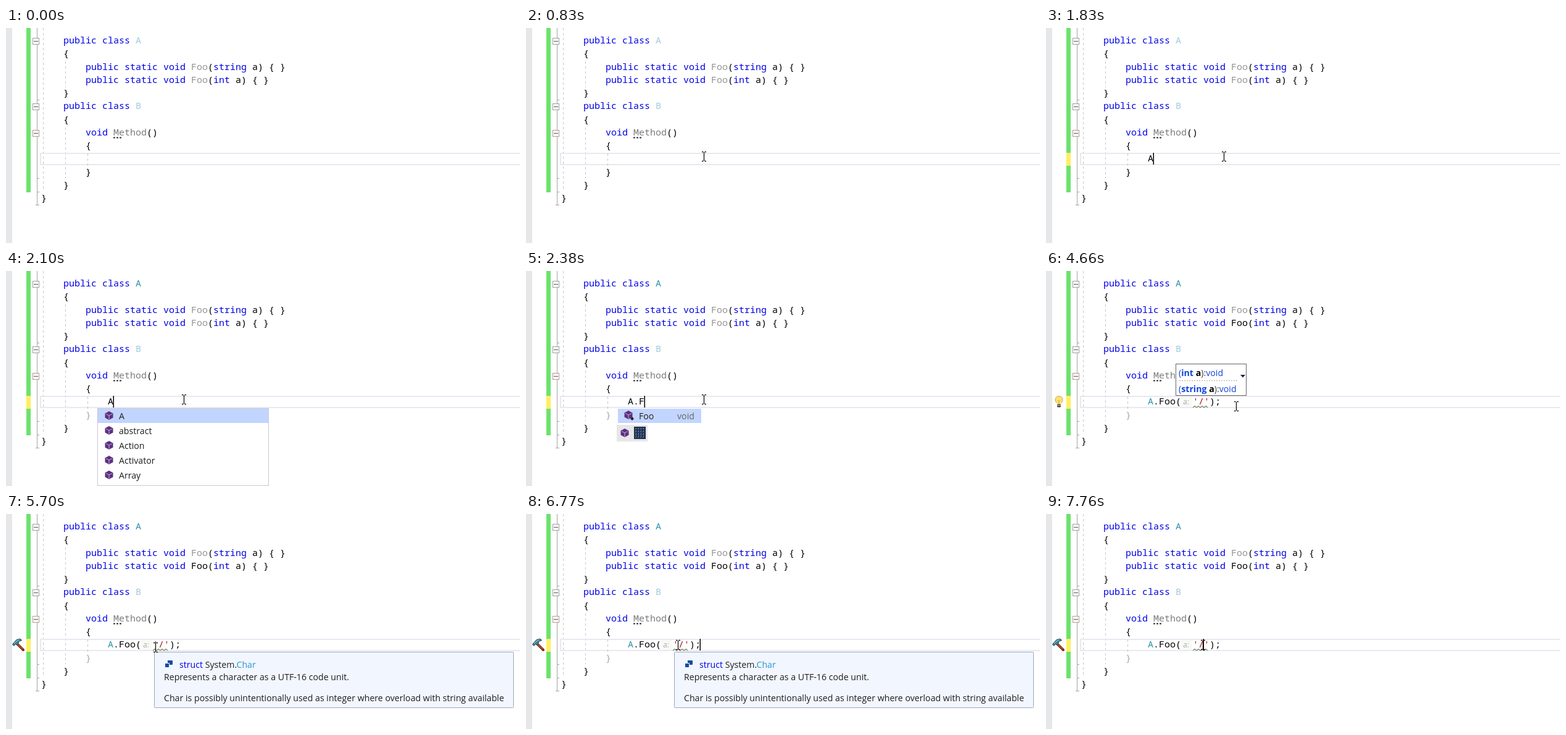
Animation of 833 by 348 pixels, one loop 8000 ms. Source, as an HTML page:

```html
<!DOCTYPE html>
<html lang="en">
<head>
<meta charset="utf-8">
<title>Code editor</title>
<style>
html, body { margin: 0; width: 100%; height: 100%; overflow: hidden; background: #fff; }
svg { display: block; }
text { white-space: pre; }
.code { font: 15px "Noto Sans Mono", "DejaVu Sans Mono", monospace; }
.ui { font: 14.17px "Open Sans", "Noto Sans", sans-serif; }
.hint { font: 12px "Open Sans", "Noto Sans", sans-serif; }
.b { font-weight: 700; }
</style>
</head>
<body>
<svg id="stage" width="833" height="348" viewBox="0 0 833 348"></svg>
<script>
const LOOP = 8000, STEP = 70;
const BLACK = '#000', KEY = '#0000e6', TYPE = '#2b91af', FADED = '#9fcbdb', GREY = '#949494';
const QUOTE = '#a31515', BLUE = '#0f43e0', PURPLE = '#5c3080';

const stage = document.getElementById('stage');
const colX = col => 57 + 9 * col;
const rowY = row => Math.round(25 + 21.25 * row);
const escapeText = s => s.replace(/&/g, '&amp;').replace(/</g, '&lt;');

const rect = (x, y, w, h, fill, extra = '') =>
  `<rect x="${x}" y="${y}" width="${w}" height="${h}" fill="${fill}" ${extra}/>`;
const path = (d, stroke, extra = '') => `<path d="${d}" fill="none" stroke="${stroke}" ${extra}/>`;
const shape = (d, fill, extra = '') => `<path d="${d}" fill="${fill}" ${extra}/>`;
const label = (x, y, s, fill, cls = 'ui') =>
  `<text class="${cls}" x="${x}" y="${y}" fill="${fill}">${escapeText(s)}</text>`;
const code = (col, row, s, fill = BLACK) => label(colX(col), rowY(row), s, fill, 'code');

// Parts are [text, colour, class] runs that follow each other.
const runs = (x, y, parts) => `<text class="ui" x="${x}" y="${y}">` +
  parts.map(([s, fill, cls = '']) => `<tspan class="${cls}" fill="${fill}">${s}</tspan>`).join('') + '</text>';

// Last entry whose start time has passed.
const at = (list, t) => list.reduce((found, item) => item[0] <= t ? item : found, list[0]);

const typed = [
  [0, ''], [1830, 'A'], [2170, 'A.'], [2310, 'A.F'],
  [2780, 'A.Foo();'], [3720, "A.Foo('');"], [3920, "A.Foo('/');"]
];
const carets = [
  [0, 0], [1100, 165], [1500, 0], [1830, 174], [2170, 183], [2310, 192], [2780, 219],
  [3320, 0], [3720, 228], [3920, 237], [4190, 256], [4400, 282], [4660, 0], [4930, 282],
  [5390, 0], [5850, 282], [6310, 0], [6770, 282], [7230, 0], [7690, 282], [7760, 255]
];
// Pointer moves: start, end, from x, y, to x, y.
const moves = [
  [200, 830, 476, 291, 288, 208],
  [1030, 1030, 297, 200, 297, 200],
  [1100, 1100, 288, 208, 288, 208],
  [4660, 5420, 308, 219, 242, 216],
  [5700, 5980, 242, 216, 246, 212],
  [7690, 7690, 240, 204, 240, 204],
  [7760, 7760, 254, 212, 254, 212]
];

function foldBox(y, color) {
  return rect(43.5, y - 4.5, 10, 10, '#fff', `stroke="${color}"`) + path(`M45 ${y + .5}H52`, '#555');
}

function margin(t) {
  const guide = (x, y1, y2) => path(`M${x} ${y1}V${y2}`, '#c8c8c8', 'stroke-dasharray="4 4"');
  return rect(0, 0, 10, 348, '#e6e7e8') +
    rect(33, 0, 7, 266, '#6ce26c') +
    (t >= 1830 ? rect(33, 202, 7, 21, '#ffee62') : '') +
    path('M50.5 0V286.5M50.5 116.5H54M50.5 243.5H54M50.5 265.5H54M48 286.5H54', '#a5a5a5') +
    foldBox(21, '#a0a0a0') + foldBox(127, '#a0a0a0') + foldBox(170, '#b59c92') +
    guide(60.5, 0, 262) + guide(96.5, 54, 96) + guide(96.5, 161, 243) +
    rect(56, 203, 790, 18, 'none', 'stroke="#e9e9f2" stroke-width="2"') +
    guide(132.5, 203, 223);
}

function listing(t) {
  const resolved = t >= 2990;
  const fooString = resolved && t < 3720 ? BLACK : GREY;
  const fooInt = resolved && (t < 3720 || t >= 4190) ? BLACK : GREY;
  const overload = (row, type, color) =>
    code(8, row, 'public static void', KEY) + code(27, row, 'Foo', color) + code(30, row, '(') +
    code(31, row, type, KEY) + code(32 + type.length, row, 'a) { }');
  return code(4, 0, 'public class', KEY) + code(17, 0, 'A', t >= 2030 ? TYPE : FADED) +
    code(4, 1, '{') + overload(2, 'string', fooString) + overload(3, 'int', fooInt) + code(4, 4, '}') +
    code(4, 5, 'public class', KEY) + code(17, 5, 'B', FADED) + code(4, 6, '{') +
    code(8, 7, 'void', KEY) + code(13, 7, 'Method', '#7c7c7c') + code(19, 7, '()') +
    path('M174 177.5H188', '#333', 'stroke-width="2" stroke-dasharray="3 2"') +
    code(8, 8, '{') + code(8, 10, '}', t >= 2030 ? '#a6a6a6' : BLACK) +
    code(4, 11, '}') + code(0, 12, '}');
}

function squiggle(x1, x2, color) {
  let d = `M${x1} 221`;
  for (let x = x1 + 3, up = true; x <= x2; x += 3, up = !up) d += `L${x} ${up ? 218.5 : 221}`;
  return path(d, color, 'stroke-width="1.1"');
}

function typedLine(t) {
  const s = at(typed, t)[1];
  const hinted = t >= 4190;
  let out = hinted ? rect(219, 204, 18, 16, '#f9f9f6') + label(222, 216, 'a:', '#aaa', 'hint') : '';
  [...s].forEach((ch, i) => {
    const literal = ch === "'" || ch === '/';
    const color = literal ? QUOTE : i === 0 && t >= 2990 ? TYPE : BLACK;
    const x = colX(12 + i) + (hinted && i > 5 ? 19 : 0);
    out += label(x, rowY(9), ch, color, 'code');
  });
  if (t >= 3200 && t < 3720) out += squiggle(210, 229, '#f0915a');
  if (t >= 4260) out += squiggle(238, 264, '#71865a');
  return out;
}

function bulb(glass, edge) {
  return `<circle cx="21" cy="208.5" r="6" fill="${glass}" stroke="${edge}"/>` +
    shape('M17.5 212H24.5L23.5 216H18.5Z', glass) +
    path('M19 209L21 211L23 209M21 211V215', edge) +
    rect(18, 215.5, 6, 5, '#4b4b50', 'rx="1"') + path('M18 217.5H24', '#bbb');
}

function hammer() {
  return path('M17 209L28 220', '#7a2b18', 'stroke-width="4" stroke-linecap="round"') +
    path('M17 208.5L27 218.5', '#c95a38', 'stroke-width="1.3"') +
    shape('M10.5 211L17 203.5L23 202L25.5 204.5L21 206L20 209.5L17 212L15 210L13 213.5Z',
      '#3c8497', 'stroke="#174451"') +
    path('M13 210L18 205L22 203.5', '#a8dce3');
}

function actionIcon(t) {
  if (t >= 5300) return hammer();
  if (t >= 4400) return bulb('#ffe27a', '#d2a52c');
  return t >= 3320 && t < 3720 ? bulb('#f3a58c', '#b9573f') : '';
}

function cube(x, y) {
  return shape(`M${x} ${y - 7}L${x + 6.5} ${y - 3.5}V${y + 3.5}L${x} ${y + 7}L${x - 6.5} ${y + 3.5}V${y - 3.5}Z`, PURPLE) +
    path(`M${x - 5} ${y - 2.5}L${x} ${y}L${x + 5} ${y - 2.5}M${x} ${y}V${y + 6}`, '#c9b4da');
}

function completion(t) {
  if (t < 1960 || t >= 2780) return '';
  if (t < 2380) {
    const names = t < 2170
      ? ['A', 'abstract', 'Action', 'Activator', 'Array']
      : ['Foo', 'Equals', 'ReferenceEquals'];
    const kinds = t < 2170 ? [] : ['void', 'bool', 'bool'];
    const h = 24 * names.length + 5;
    return rect(148.5, 222.5, 277, h, '#fff', 'stroke="#c8c8d0"') +
      rect(149, 223, 276, 23, '#c2d5ff') +
      names.map((name, i) => cube(167, 234 + 24 * i) + label(183, 240 + 24 * i, name, '#1e1e1e') +
        label(386, 240 + 24 * i, kinds[i] || '', '#666')).join('');
  }
  let grid = rect(175, 252, 19, 20, '#223352');
  for (let i = 0; i < 4; i++)
    grid += path(`M177 ${255.5 + 4.5 * i}H192M${178.5 + 4 * i} 254V270`, '#91a4c4', 'stroke-width=".7" stroke-dasharray="2 2"');
  return rect(149, 223, 135, 23, '#c2d5ff') + cube(166, 233) +
    shape('M172 236L175 239L172 242L169 239Z', '#252025') +
    label(183, 240, 'Foo', '#1e1e1e') + label(245, 240, 'void', '#666') +
    rect(147, 249, 50, 27, '#e7e7ea') + cube(160, 262) + grid;
}

function parameterInfo(t) {
  if (t < 2850 || t >= 5200) return '';
  const signature = (type, y) => runs(215, y, [
    ['(', BLUE], [type, BLUE, 'b'], [' ', BLACK], ['a', BLACK, 'b'], ['):', '#444'], ['void', BLUE]
  ]);
  const arrow = t < 4120 ? 'M315 186H323L319 181.5Z' : 'M315 168H323L319 172.5Z';
  return rect(210.5, 150.5, 114, 51, '#fff', 'stroke="#666"') +
    signature('int', 170) + signature('string', 196) +
    path('M216 177.5H311', '#aaa', 'stroke-dasharray="2 2"') + shape(arrow, '#202048');
}

function tooltip(t) {
  if (t < 5630 || t >= 7690) return '';
  return rect(240.5, 223.5, 582, 90, '#f2f6fe', 'stroke="#9aa5bd" rx="1"') +
    rect(262, 237, 8, 7, '#164c9c') + rect(257, 241, 8, 8, '#f2f6fe') + rect(258, 242, 6, 6, '#164c9c') +
    runs(281, 249, [['struct', '#0000e6'], [' System.', '#1e1e1e'], ['Char', '#2797d0']]) +
    label(256, 269, 'Represents a character as a UTF-16 code unit.', '#1e1e1e') +
    label(256, 303, 'Char is possibly unintentionally used as integer where overload with string available', '#1e1e1e');
}

function pointer(t) {
  if (t < moves[0][0]) return '';
  const [start, end, x1, y1, x2, y2] = at(moves, t);
  const held = Math.floor((t - start) / STEP) * STEP;
  const p = end > start ? Math.min(1, held / (end - start)) : 1;
  const e = p * p * (3 - 2 * p);
  const x = Math.round(x1 + (x2 - x1) * e), y = Math.round(y1 + (y2 - y1) * e);
  const beam = 'M-3 -7.5H-.5M1.5 -7.5H4M.5 -7V7M-3 7.5H-.5M1.5 7.5H4';
  return `<g transform="translate(${x} ${y})">${path(beam, '#111', 'stroke-width="1.3"')}</g>`;
}

function caret(t) {
  const x = at(carets, t)[1];
  return x ? rect(x - .5, 202, 1.5, 19, BLACK) : '';
}

let shown = '';
function draw(t) {
  const picture = [margin, listing, typedLine, actionIcon, caret, completion, parameterInfo, tooltip, pointer]
    .map(part => part(t)).join('');
  if (picture !== shown) stage.innerHTML = shown = picture;
}

const origin = performance.now();
function tick() {
  draw((performance.now() - origin) % LOOP);
  requestAnimationFrame(tick);
}
tick();
</script>
</body>
</html>
```
